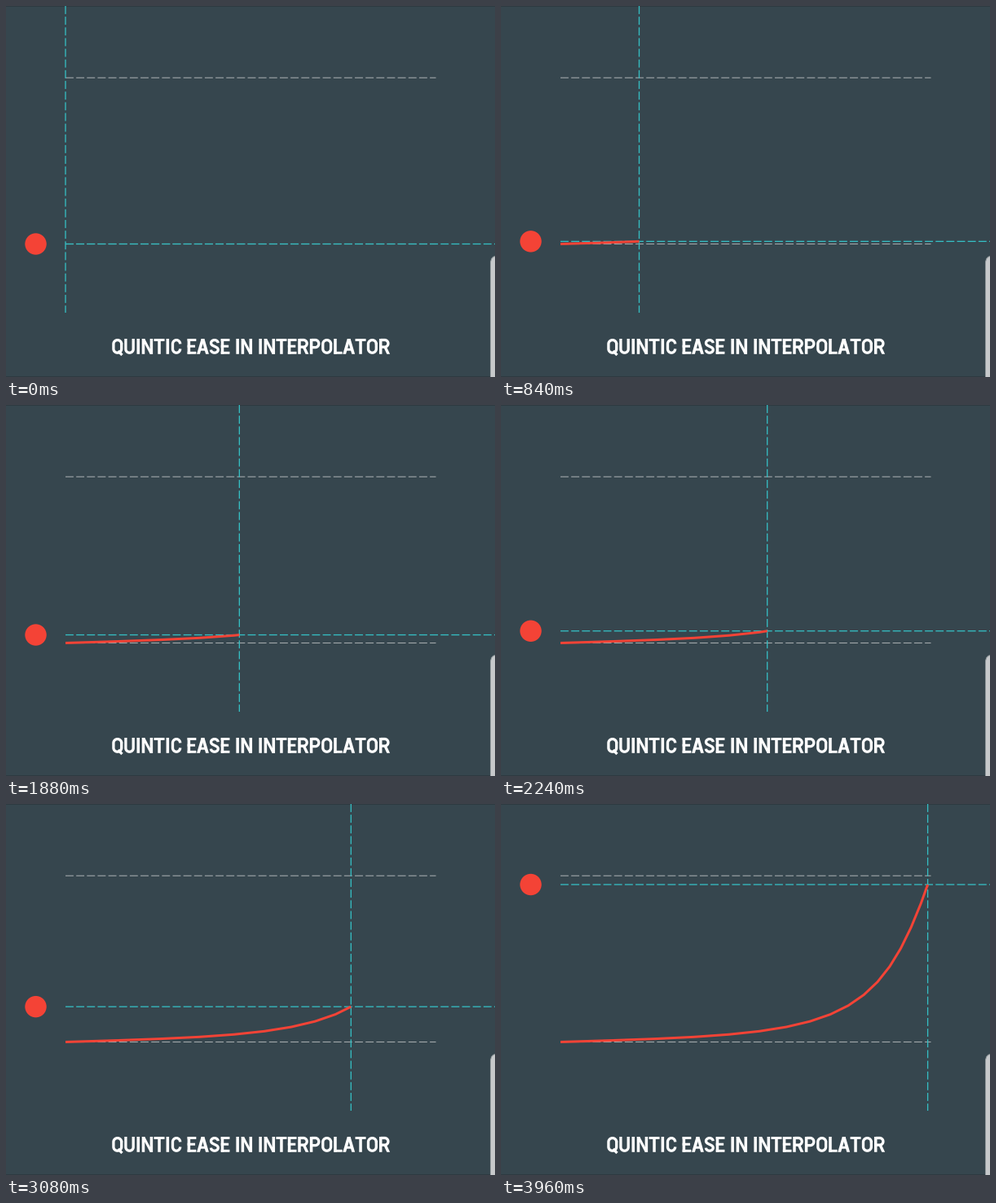
Write a matplotlib script that moves like this. It is 600x456 px and loops after 4 s.

```python
import matplotlib.pyplot as plt
import numpy as np
from matplotlib.animation import FuncAnimation
from matplotlib.patches import Circle, FancyBboxPatch, Polygon

W, H, DPI = 600, 456, 96
FRAMES, STEP = 100, 40
PT = 72 / DPI  # points per pixel

BG, EDGE = "#36464e", "#2d3a41"
RED, TEAL, GREY, PANEL = "#f44336", "#35bfc4", "#a3a9ac", "#c6c9cb"
LEFT, RIGHT, TOP, BASE = 73, 527.5, 88.2, 292.5

plt.rcParams["lines.scale_dashes"] = False
plt.rcParams["path.snap"] = False

fig = plt.figure(figsize=(W / DPI, H / DPI), dpi=DPI, facecolor=BG)
ax = fig.add_axes([0, 0, 1, 1])
ax.set_xlim(0, W)
ax.set_ylim(H, 0)
ax.axis("off")


def line(xs, ys, color, width, z=1, dashed=False):
    style = (0, (9.9 * PT, 3.25 * PT)) if dashed else "-"
    return ax.plot(xs, ys, color=color, lw=width * PT, ls=style, zorder=z,
                   solid_capstyle="butt", dash_capstyle="butt",
                   solid_joinstyle="round")[0]


# --- Caption: condensed bold capitals built from slabs and arcs -----------
CAP, STEM, BAR = 18.8, 3.5, 3.0


def slab(x0, y0, x1, y1, w):
    """Parallelogram from bottom-left to top-left with a horizontal width."""
    return "fill", [(x0, y0), (x0 + w, y0), (x1 + w, y1), (x1, y1)]


def stem(x=1.05):
    return slab(x, 0, x, CAP, STEM)


def bar(x, y, w):
    return slab(x, y, x, y + BAR, w)


def arc(cx, cy, rx, ry, a, b):
    t = np.radians(np.linspace(a, b, 24))
    return list(zip(cx + rx * np.cos(t), cy + ry * np.sin(t)))


def stroke(*parts):
    return "stroke", [p for part in parts for p in part]


def ring(cx, rx, closed):
    upper = arc(cx, 12.4, rx, 4.8, 0, 180)
    lower = arc(cx, 6.4, rx, 4.8, 180, 360)
    return stroke(upper, lower, upper[:2] if closed else [])


def bowl(low):
    top = CAP - BAR / 2
    r = (top - low) / 2
    return stroke([(3, top)], arc(7.7, low + r, 4.3, r, 90, -90), [(3, low)])


# letter: (advance, shapes)
GLYPHS = {
    " ": (5.6, []),
    "A": (15.0, [slab(0.1, 0, 5.55, CAP, 3.8), slab(11.1, 0, 5.65, CAP, 3.8),
                 bar(3.4, 4.1, 8.2)]),
    "C": (14.2, [ring(7.3, 4.6, False)]),
    "E": (12.4, [stem(), bar(1.05, 0, 10.7), bar(1.05, 8.1, 9.4),
                 bar(1.05, CAP - BAR, 10.7)]),
    "I": (6.9, [stem(1.7)]),
    "L": (12.0, [stem(), bar(1.05, 0, 10.4)]),
    "N": (15.5, [stem(), stem(10.95), slab(10.95, 0, 1.05, CAP, STEM)]),
    "O": (15.0, [ring(7.5, 4.9, True)]),
    "P": (14.4, [stem(), bowl(8.2)]),
    "Q": (15.0, [ring(7.5, 4.9, True), stroke([(8.2, 3.8), (13.2, -1.2)])]),
    "R": (14.6, [stem(), bowl(8.7), slab(10.4, 0, 6.2, 9, 3.8)]),
    "S": (13.7, [stroke(arc(6.85, 13.6, 4.3, 3.6, 0, 235),
                        arc(6.85, 5.2, 4.4, 3.6, 55, -180))]),
    "T": (13.7, [stem(5.1), bar(0.35, CAP - BAR, 13.0)]),
    "U": (14.5, [stroke([(2.6, CAP)], arc(7.25, 6.0, 4.65, 4.4, 180, 360),
                        [(11.9, CAP)])]),
}


def caption(text, x, baseline):
    for ch in text:
        advance, shapes = GLYPHS[ch]
        for kind, pts in shapes:
            pts = np.array(pts) * (1, -1) + (x, baseline)
            if kind == "fill":
                ax.add_patch(Polygon(pts, fc="white", lw=0))
            else:
                line(pts[:, 0], pts[:, 1], "white", 3.3)
        x += advance


# --- Still parts ----------------------------------------------------------
line([0, W], [0.5, 0.5], EDGE, 1)
line([0, W], [H - 0.5, H - 0.5], EDGE, 1)
ax.add_patch(FancyBboxPatch((594.5, 307), 40, 200, fc=PANEL, ec="#8f979b",
                            lw=0.7, boxstyle="round,pad=0,rounding_size=9"))
for y in (TOP, BASE):
    line([LEFT, RIGHT], [y, y], GREY, 1.1, dashed=True)
caption("QUINTIC EASE IN INTERPOLATOR", 129.3, 427.8)

# --- Easing curve: cubic Bezier flattened into sixteen chords -------------
t = np.linspace(0, 1, 17)
b1, b2, b3 = 3 * (1 - t) ** 2 * t, 3 * (1 - t) * t ** 2, t ** 3
curve_x = LEFT + (RIGHT - LEFT) * (0.755 * b1 + 0.855 * b2 + b3)
curve_y = BASE + (TOP - BASE) * (0.05 * b1 + 0.06 * b2 + b3)

# Near-linear sweep with slight timing wobble
TICKS = [0, 21, 37, 56, 77, 88, 99]
SWEEP = [73, 169.5, 241.5, 326.7, 423.3, 472.7, 523.6]

vert = line([LEFT, LEFT], [0, 377], TEAL, 1.3, z=2, dashed=True)
horiz = line([LEFT, W], [BASE, BASE], TEAL, 1.3, z=2, dashed=True)
trace = line([], [], RED, 3, z=3)
dot = ax.add_patch(Circle((36.5, BASE), 13.2, fc=RED, lw=0, zorder=3))


def draw(i):
    x = np.interp(i, TICKS, SWEEP)
    y = np.interp(x, curve_x, curve_y)
    done = curve_x < x
    vert.set_xdata([x, x])
    horiz.set_ydata([y, y])
    trace.set_data(np.append(curve_x[done], x), np.append(curve_y[done], y))
    dot.center = (36.5, y)
    return vert, horiz, trace, dot


anim = FuncAnimation(fig, draw, frames=FRAMES, interval=STEP,
                     init_func=lambda: draw(0), repeat=True, repeat_delay=0)
plt.show()
```
